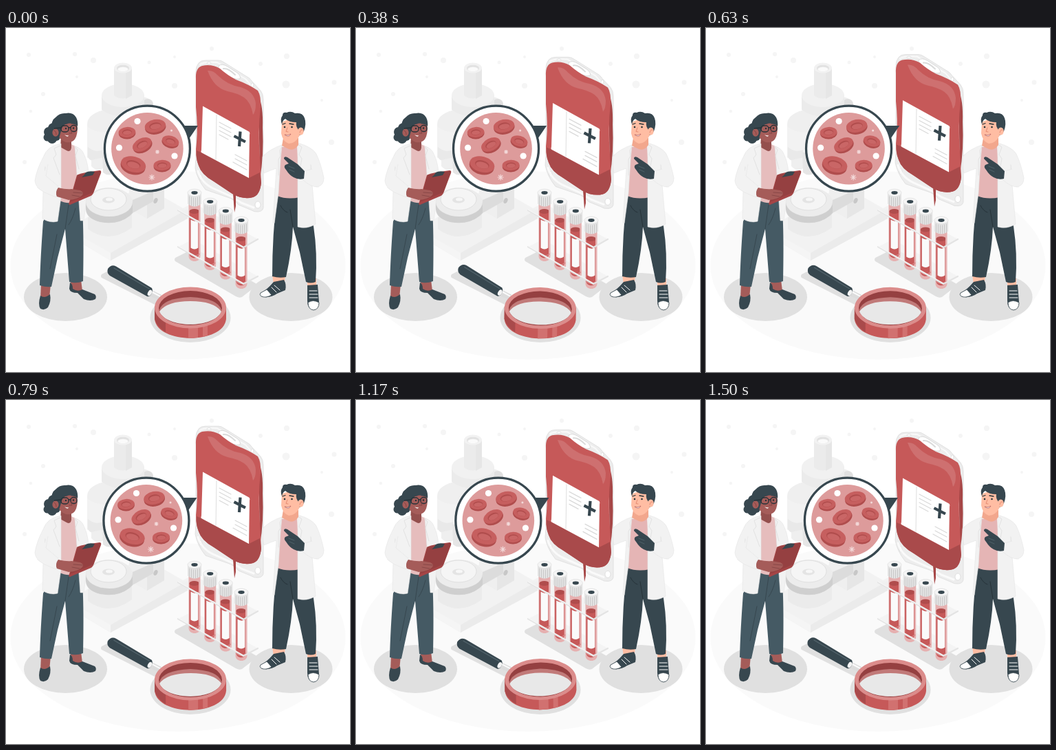
Write an HTML page that moves like this. It is 500 px wide and 500 px high and loops after 1540 ms.

```html
<!DOCTYPE html>
<html lang="en">
<head>
<meta charset="utf-8">
<title>Blood test</title>
<style>
html,body{margin:0;width:100%;height:100%;overflow:hidden;background:#fff}
svg{display:block;width:100vw;height:100vh}
.ln{fill:none;stroke-linecap:round;stroke-linejoin:round}
.coat{fill:#f2f2f2;stroke:#e4e4e4;stroke-width:.6;stroke-linejoin:round}
.dark{fill:#37474f}
.red{fill:#c65959}
.tan{fill:#a55c59}
.skin{fill:#ffbda3}
</style>
</head>
<body>
<svg viewBox="0 0 500 500" xmlns="http://www.w3.org/2000/svg">
<defs>
  <g id="cell">
    <ellipse cy="1.5" rx="15" ry="10" fill="#b04d4d"/>
    <ellipse cy="-.7" rx="15" ry="9.2" fill="#c65f5f"/>
    <ellipse cy="-.6" rx="8.600" ry="4.800" fill="#b04d4d"/>
    <ellipse cx=".3" cy=".3" rx="7.700" ry="3.800" fill="#c96666"/>
  </g>
  <g id="tube">
    <path d="M-8.500 16V92C-8.500 102 8.500 102 8.500 92V16Z" fill="#e6b0b0"/>
    <path d="M-7.500 27V88C-7.500 97 7 97 7 88V27Z" class="red"/>
    <ellipse cx="-.3" cy="27" rx="7.200" ry="3.400" fill="#b04d4d"/>
    <path d="M7 22V92" stroke="#e6b0b0" stroke-width="2"/>
    <path d="M-5.500 39Q0 43 5.300 39.500V80Q0 84-5.500 80Z" fill="#fafafa"/>
    <path d="M-7 89Q0 95 7 89" class="ln" stroke="#d98585" stroke-width="1.600"/>
    <path d="M-10 1V16Q0 24 10 16V1Z" fill="#e4e4e4"/>
    <path d="M-7.500 5V18M-4.500 6V19M-1.500 7V20M1.500 7V20M4.500 6V19M7.500 5V18" stroke="#c2c2c2" stroke-width=".8"/>
    <ellipse rx="10" ry="5.400" fill="#f5f5f5" stroke="#d8d8d8" stroke-width=".6"/>
    <ellipse rx="4.600" ry="2.400" class="dark"/>
  </g>
</defs>

<rect width="500" height="500" fill="#fff"/>
<g id="dots" fill="#f5f5f5"></g>
<ellipse cx="250" cy="345" rx="243.500" ry="137" fill="#fafafa"/>

<g id="microscope">
  <path d="M110 280L198 228L266 267L263 277L152 338L110 313Z" fill="#f2f2f2"/>
  <path d="M152 327L264 263V277L152 338Z" fill="#ebebeb"/>
  <path d="M110 303L152 327V338L110 313Z" fill="#f5f5f5"/>
  <path d="M184 105Q202 94 213 108V225L230 236V263L205 277L178 262Z" fill="#efefef"/>
  <path d="M205 236L230 224V262L205 277Z" fill="#e6e6e6"/>
  <ellipse cx="206" cy="111" rx="8" ry="8" fill="#e0e0e0"/>
  <ellipse cx="217.500" cy="251" rx="2.800" ry="4.200" fill="#c7c7c7" transform="rotate(22 217.500 251)"/>
  <path d="M118 139Q119 126 139 120L197 118V202Q184 218 169 211L155 190Q140 202 118 188Z" fill="#efefef"/>
  <path d="M118 143Q137 158 163 147V179Q136 188 118 173Z" fill="#f2f2f2"/>
  <path d="M119 173Q130 182 141 177V190Q138 196 128 194Q120 192 119 187Z" fill="#e9e9e9"/>
  <path d="M124 192V201Q134 211 142 203V188Z" fill="#efefef"/>
  <path d="M140 180L155 186V212Q148 216 141 210Z" fill="#e6e6e6"/>
  <path d="M139 99V119Q169 139 201 117V97Z" fill="#ebebeb"/>
  <ellipse cx="170" cy="98" rx="31" ry="17" fill="#f1f1f1"/>
  <path d="M157 59V98Q169 107 183 98V59Z" fill="#ebebeb"/>
  <path d="M174 64V103L183 98V59Z" fill="#e6e6e6"/>
  <ellipse cx="170" cy="58" rx="13" ry="7.500" fill="#f2f2f2"/>
  <ellipse cx="170" cy="58.500" rx="9" ry="4.800" fill="#e2e2e2"/>
  <ellipse cx="170" cy="60" rx="7.500" ry="3.300" fill="#fafafa"/>
  <path d="M119 275V292Q149 315 183 290V270Z" fill="#ebebeb"/>
  <path d="M116 252V264Q117 277 137 282Q162 287 180 273L184 269V252Z" fill="#cfcfcf"/>
  <path d="M184 250V269L214 252V237Z" fill="#dcdcdc"/>
  <ellipse cx="150" cy="253" rx="34" ry="21" fill="#ececec"/>
  <ellipse cx="149" cy="249" rx="26" ry="16" fill="#f5f5f5" stroke="#e0e0e0"/>
  <ellipse cx="149" cy="250" rx="9" ry="4.500" fill="#e4e4e4"/>
  <ellipse cx="150" cy="249" rx="5" ry="2.500" fill="#f7f7f7"/>
</g>

<g fill="#e0e0e0">
  <ellipse cx="86.500" cy="391" rx="60.500" ry="35"/>
  <ellipse cx="414" cy="391" rx="60.500" ry="35"/>
  <ellipse cx="268" cy="421" rx="58.500" ry="36"/>
  <path d="M139 358L147 354L224 395L216 402L139 363Q137 361 139 358Z"/>
  <path d="M246 334L274 320L366 373L343 391Q339 393 334 390L246 339Q244 337 246 334Z"/>
</g>

<g id="woman">
  <path d="M51 372H65L63 393H50Z" class="tan"/>
  <path d="M93 366H109L111 382L97 383Z" class="tan"/>
  <path d="M50 389Q56 394 64 387Q66 397 61 406Q56 411 50 408Q46 402 50 389Z" class="dark"/>
  <path d="M93 370Q97 372 97 379Q104 384 111 380L129 387Q132 390 130 394Q123 398 113 394L104 385Q93 385 92 379Z" class="dark"/>
  <path d="M76 241H108Q114 266 112 368Q102 372 92 369L86 292L75 334L66 376Q58 377 49 374Q50 335 54 281Z" fill="#455a64"/>
  <path d="M86 292L91 257M101 262Q97 278 91 286M74 300L64 350" class="ln" stroke="#37474f" stroke-width="1"/>
  <path d="M78 174L93 168L105 174L109 249Q93 259 76 250Z" fill="#e6bdbd"/>
  <path d="M80 160H95V174Q94 181 88 178L79 173Z" fill="#944f4d"/>
  <path d="M100 172Q110 174 114 185Q121 200 120 223L113 280H108Z" class="coat"/>
  <path d="M80 168Q60 171 54 188Q44 207 42 222Q43 232 54 237L53 277Q64 284 75 281L80 246Z" class="coat"/>
  <path d="M79 171L70 175L73 184L69 189L78 213M99 172L104 177L101 186L106 205M55 237L57 202" class="ln" stroke="#e2e2e2"/>
  <path d="M61 198L58 215L76 230L73 246Q51 238 45 231" class="coat"/>
  <path d="M103 214Q106 211 136 207Q139 207 138 211L127 240Q125 244 121 245L93 257Q90 257 92 253Z" fill="#a54546"/>
  <path d="M104 214L138 208L127 239L93 253Z" fill="#954041"/>
  <path d="M110 217Q114 214 116 210Q121 207 129 209L126 214Z" class="dark"/>
  <path d="M76 232Q88 235 95 234L108 236Q114 239 111 243Q105 249 91 250L74 245Q71 238 76 232Z" class="tan"/>
  <path d="M98 239L111 240M96 243L107 245" class="ln" stroke="#824343" stroke-width=".8"/>
  <g class="dark">
    <circle cx="69" cy="146" r="8"/><circle cx="62" cy="151" r="7"/>
    <circle cx="60" cy="159" r="5.500"/><circle cx="67" cy="161" r="7"/><circle cx="73" cy="158" r="6"/>
  </g>
  <path d="M73 142Q86 129 103 138Q105 149 102 158Q98 168 87 166Q78 163 74 153Z" class="tan"/>
  <path d="M68 147Q64 135 72 130Q78 123 87 124Q97 122 102 130Q105 136 104 143Q98 137 88 139Q81 142 80 150L77 160Q68 157 68 147Z" class="dark"/>
  <ellipse cx="72" cy="152" rx="4.600" ry="5.800" class="tan"/>
  <path d="M70 149Q73 150 73 155" class="ln" stroke="#824343"/>
  <g fill="none" stroke="#263238" stroke-width="1.400">
    <rect x="80" y="142" width="11" height="9" rx="4"/><rect x="94" y="141.500" width="9" height="9" rx="4"/>
    <path d="M70 146L80 145M91 145L94 144.500"/>
  </g>
  <path d="M82 140L89 139M95 139L100 139" class="ln" stroke="#37474f" stroke-width="1.200"/>
  <circle cx="87" cy="146" r="1.200" fill="#263238"/><circle cx="98" cy="145.500" r="1.200" fill="#263238"/>
  <path d="M94 148L96 153L92 153" class="ln" stroke="#824343"/>
  <path d="M85 155Q89 157 91 156Q90 160 85 155Z" fill="#fff"/>
</g>

<g id="bag">
  <path d="M276 63Q276 56 280 51Q283 47 290 47H309Q313 47 317 50L349 70Q354 72 358 78L370 91Q374 96 374 104V258Q375 266 367 267Q361 268 355 264L338 257Q332 249 322 246L290 235Q278 220 275 204Q277 180 276 150Z" fill="#ededed" stroke="#dcdcdc" stroke-width=".8"/>
  <path d="M282 53Q287 49 307 50L348 74L368 97" class="ln" stroke="#f9f9f9" stroke-width="2"/>
  <path d="M309 55Q314 51 322 56L336 65Q342 70 340 74Q332 76 315 66Q308 60 309 55Z" fill="#fff" stroke="#dadada"/>
  <path d="M316 59Q323 58 333 68" class="ln" stroke="#dadada" stroke-width="2"/>
  <g fill="#fff" stroke="#d6d6d6" stroke-width=".7">
    <ellipse cx="295" cy="51" rx="3" ry="1.500"/><ellipse cx="358" cy="83" rx="2" ry="3"/>
    <ellipse cx="283" cy="217" rx="2" ry="4"/><ellipse cx="366" cy="257" rx="4" ry="5"/>
  </g>
  <path d="M279 208Q284 225 301 233L328 245L342 254L360 261" class="ln" stroke="#fafafa" stroke-width="3"/>
  <path d="M367 100Q374 112 373 145Q375 185 369 220Z" fill="#a64747"/>
  <path d="M330 240H334V259L332 268Z" fill="#a64747"/>
  <path d="M276 74Q275 58 285 55Q299 52 311 59Q321 68 334 75Q353 82 366 91Q371 99 370 115Q366 150 369 188L371 225Q369 243 359 246Q345 250 329 241L302 223Q284 213 280 200Q274 187 277 166Q279 143 276 115Z" class="red"/>
  <path d="M277 178L284 181L353 218L369 210L371 225Q369 243 359 246Q345 250 329 241L302 223Q284 213 280 200Q276 190 277 178Z" fill="#a94a4b"/>
  <path d="M293 62Q301 61 308 69Q322 83 341 86Q361 92 363 110Q363 122 359 126Q356 108 346 101Q337 95 322 92Q302 87 293 62Z" fill="#ce7070"/>
  <path d="M286 113.500L353 150.500Q355 152 354 155L353 218L284 181Q283 180 284 177Z" fill="#fff"/>
  <path d="M306 126L305 192" stroke="#dedede"/>
  <path d="M310 137L327 146M310 143L327 152M310 149L327 158M310 155L323 162M333 184L350 193M333 190L350 199M330 195L350 206" class="ln" stroke="#d9d9d9" stroke-width="1.200"/>
  <path d="M331.500 157L348 165.500M340.500 150.500L339 172" fill="none" stroke="#37474f" stroke-width="4.200"/>
</g>

<g id="rack">
  <path d="M250 266L272 254L366 307L345 319Z" fill="#f2f2f2" opacity=".8"/>
  <path d="M250 318L272 307L366 361L345 373Z" fill="#f2f2f2" opacity=".7"/>
  <use href="#tube" x="274" y="239.500"/><use href="#tube" x="296.700" y="252.500"/>
  <use href="#tube" x="319.300" y="266"/><use href="#tube" x="342" y="279.500"/>
  <g class="ln" stroke="#e4e4e4" stroke-width="2.200">
    <path d="M250 265L345 319L366 307M250 318L345 372L366 361"/>
  </g>
  <path d="M250 264L345 318M250 317L345 371" class="ln" stroke="#fafafa"/>
</g>

<g id="bubble">
  <path d="M255 142H279L264 164Z" class="dark"/>
  <circle cx="205.400" cy="175.200" r="62" fill="#fff" stroke="#37474f" stroke-width="3.300"/>
  <circle cx="205.400" cy="175.200" r="52.300" fill="#dd9b9b"/>
  <g id="cells"></g>
  <g fill="#fff"><circle cx="191" cy="135.500" r="4.600"/><circle cx="164.500" cy="174" r="4.600"/><circle cx="245" cy="186" r="4.600"/></g>
  <g id="sparks" stroke="#f3d9d9" stroke-width="1.200" class="ln"></g>
</g>

<g id="man">
  <path d="M387 359H406L404 377L390 379Z" class="skin"/>
  <path d="M437 364H451V380H439Z" class="skin"/>
  <path d="M389 369L404 366Q408 373 406 381L394 386Q386 392 375 391Q368 390 370 385Q379 381 389 369Z" class="dark"/>
  <path d="M370 385Q376 382 379 380L386 388Q378 393 371 390Q368 388 370 385Z" fill="#fff" stroke="#37474f" stroke-width=".8"/>
  <path d="M438 374L453 373L455 399Q454 409 447 410Q438 408 438 397Z" class="dark"/>
  <path d="M439 399Q446 394 455 399Q455 409 447 410Q439 409 439 399Z" fill="#fff" stroke="#37474f" stroke-width=".8"/>
  <path d="M386 377L393 384M390 374L398 381M441 382H452M441 387H453M441 392H453" class="ln" stroke="#fff"/>
  <path d="M394 243H427L447 288Q453 328 450 369Q443 372 436 369L427 326L417 289Q416 320 407 362Q397 364 387 361Q387 300 394 243Z" class="dark"/>
  <path d="M417 289L413 264M399 258Q403 266 409 268" class="ln" stroke="#263238"/>
  <path d="M400 173L423 170L427 246Q409 250 394 244Z" fill="#e5b5b5"/>
  <path d="M401 170Q383 176 373 187Q373 204 375 211Q386 206 393 204L388 283L390 284L396 240L399 192Z" class="coat"/>
  <path d="M424 167Q445 173 451 183Q458 198 462 218Q462 229 452 231L445 228L450 285Q437 293 424 289V210Z" class="coat"/>
  <path d="M424 169L430 173L426 184L430 190L425 216M402 171L398 178L399 186L396 191L396 214M443 199L445 229" class="ln" stroke="#e2e2e2"/>
  <path d="M445 205L434 208L431 220Q443 232 455 231" class="coat"/>
  <path d="M434 208L424 198L409 188Q404 186 404 190L411 197L406 199Q403 202 407 206Q412 214 418 217Q425 221 433 219Z" class="dark"/>
  <path d="M411 201L419 204M412 206L419 209" class="ln" stroke="#55676f" stroke-width=".8"/>
  <path d="M403 160H425V170Q419 179 411 176L401 171Z" fill="#f2a78d"/>
  <path d="M401 137Q412 130 428 136L427 156Q421 168 411 168Q402 165 400 153Z" class="skin"/>
  <path d="M401 140Q398 132 402 127Q402 122 408 123Q414 120 420 124Q431 122 434 131Q437 139 433 150L427 156L425 148Q421 143 422 137Q411 137 406 132Q402 134 401 140Z" class="dark"/>
  <ellipse cx="428.500" cy="150" rx="4.200" ry="5.500" class="skin"/>
  <path d="M427 152Q428 147 431 148" class="ln" stroke="#e58c73"/>
  <path d="M402 140L406 138.500M412 139L418 140" class="ln" stroke="#263238" stroke-width="1.300"/>
  <circle cx="405" cy="144" r="1.300" fill="#263238"/><circle cx="415.500" cy="144" r="1.300" fill="#263238"/>
  <path d="M409 145L407 150.500L410 151" class="ln" stroke="#e58c73"/>
  <path d="M405 155Q410 157 414 154Q411 160 405 155Z" fill="#fff" stroke="#a64747" stroke-width=".6"/>
</g>

<g id="lens">
  <path d="M208 379L226 388L222 395L205 388Z" fill="#dcdcdc"/>
  <path d="M211 383L224 390" class="ln" stroke="#fafafa" stroke-width="2"/>
  <path d="M160 346.500L212 378Q214 382 211 387Q209 391 205 390L151 360Q146 356 148 350Q153 343 160 346.500Z" class="dark"/>
  <path d="M157 349L208 379" class="ln" stroke="#53646c" stroke-width="1.200"/>
  <ellipse cx="209" cy="385" rx="2.800" ry="4.600" fill="#f5f5f5" transform="rotate(28 209 385)"/>
  <path d="M216 405V423C220 460 316 460 320 423V405Z" class="red"/>
  <path d="M216 405V423Q219 434 232 442V422Z" fill="#a94a4b"/>
  <path d="M265 433L279 432V450L265 451ZM286 431L293 429V447L286 449Z" fill="#d17170"/>
  <ellipse cx="268" cy="406.500" rx="52" ry="30" fill="#db8c8b"/>
  <ellipse cx="268" cy="407" rx="46" ry="25" fill="#954041"/>
  <path d="M223 410Q227 393 268 391Q309 393 313 410C306 438 230 438 223 410Z" fill="#c17a79"/>
  <path d="M223 412Q234 397 268 397Q302 397 313 412C303 437 233 437 223 412Z" fill="#e8e8e8"/>
</g>
</svg>
<script>
const $ = id => document.getElementById(id);

const dots = [[33,39,3],[100,38,3],[127,47,4],[208,50,2.5],[245,42,2],[299,30,3],[370,52,3],
  [408,41,4],[477,79,3.5],[407,82,5.5],[245,84,4],[54,96,3],[103,71,2],[36,121,2.3],
  [27,195,3],[473,166,4],[459,105,2]];
$('dots').innerHTML = dots.map(([x, y, r]) => `<circle cx="${x}" cy="${y}" r="${r}"/>`).join('');

// x, y, scale, angle
const cells = [[217,143,1.02,-10],[176,152,.82,-4],[198,170,.98,-27],[239,165,.83,16],[185,199,1.22,15],[227,200,.83,-2]];
$('cells').innerHTML = cells.map(([x, y, s, a]) =>
  `<use href="#cell" transform="translate(${x} ${y}) rotate(${a}) scale(${s})"/>`).join('');

function spark(x, y, r) {
  let d = '';
  for (let i = 0; i < 4; i++) {
    const dx = r * Math.cos(i * Math.PI / 4), dy = r * Math.sin(i * Math.PI / 4);
    d += `M${x - dx} ${y - dy}L${x + dx} ${y + dy}`;
  }
  return `<path d="${d}"/>`;
}
$('sparks').innerHTML = spark(220, 180, 2.5) + spark(212, 217, 4) + spark(240.5, 149, 1);

const LOOP = 1540, CYCLE = 1500;
const shakes = [0, -1, 2, -4, 4, -4, 4, -4, 2, -1, 0];
const ease = p => 1 - (1 - p ** 1.2) ** 1.6;

function shake(p) {
  const i = Math.min(9, Math.floor(p * 10));
  return shakes[i] + (shakes[i + 1] - shakes[i]) * ease(p * 10 - i);
}

function draw(ms) {
  const p = Math.min(1, ms % LOOP / CYCLE), a = 2 * Math.PI * p;
  $('bag').setAttribute('transform', `translate(0 ${-4.5 * (1 - Math.cos(a))})`);
  $('bubble').setAttribute('transform', `translate(${shake(p)} 0)`);
  $('lens').setAttribute('transform', `rotate(${Math.sin(a)} 234 398)`);
}

function tick() {
  draw(performance.now());
  requestAnimationFrame(tick);
}
tick();
</script>
</body>
</html>
```
